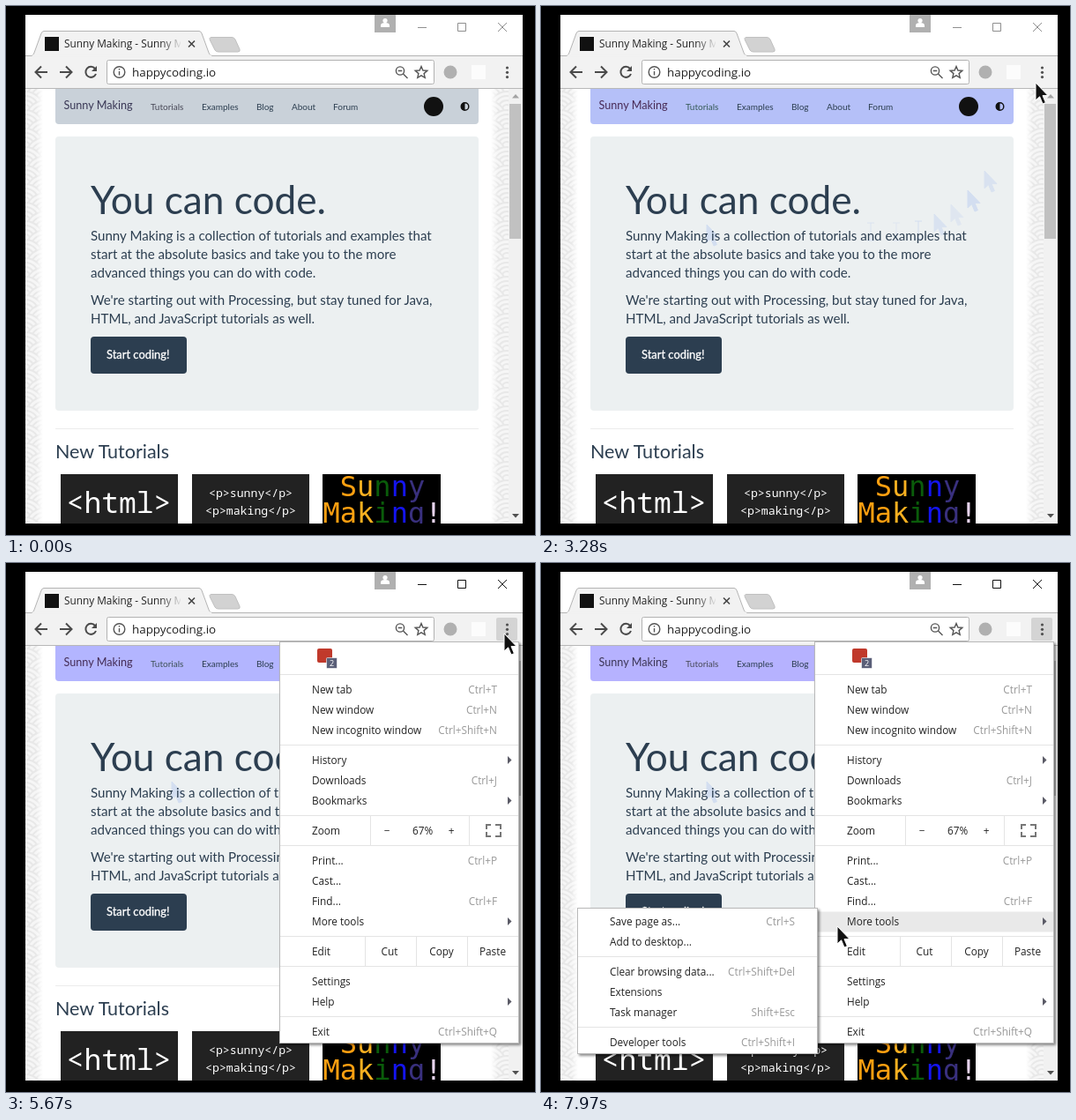
These frames come from a looping animation (600 by 600 pixels, 8000 ms). An HTML page:

```html
<!DOCTYPE html>
<html lang="en">
<head>
<meta charset="utf-8">
<title>Browser menu</title>
<style>
html, body { margin: 0; width: 100%; height: 100%; overflow: hidden; background: #000; }
svg { display: block; width: 100vw; height: 100vh; }
text { white-space: pre; }
.page { font-family: Lato, sans-serif; fill: #2c3e50; }
.lead { font-size: 15.1px; }
.nav { font-size: 10px; }
.ui { font-family: "Open Sans", "Noto Sans", sans-serif; font-size: 11.8px; fill: #222; }
.key { fill: #999; text-anchor: end; }
.mid { text-anchor: middle; }
.code { font-family: "Noto Sans Mono", monospace; fill: #fff; text-anchor: middle; }
.art { font: 32px "DejaVu Sans Mono", monospace; text-anchor: middle; fill: url(#rainbow); }
.line { fill: none; stroke: #e4e4e4; }
.icon { fill: none; stroke: #4a4a4a; stroke-width: 2; }
</style>
</head>
<body>
<svg viewBox="0 0 600 600" xmlns="http://www.w3.org/2000/svg">
  <defs>
    <clipPath id="view"><rect x="22" y="94" width="564" height="493"/></clipPath>
    <clipPath id="tabText"><rect x="60" y="30" width="138" height="26"/></clipPath>
    <linearGradient id="fade"><stop stop-color="#f2f2f2" stop-opacity="0"/><stop offset="1" stop-color="#f2f2f2"/></linearGradient>
    <linearGradient id="edgeL"><stop stop-color="#fff" stop-opacity="0"/><stop offset="1" stop-color="#fff"/></linearGradient>
    <linearGradient id="edgeR"><stop stop-color="#fff"/><stop offset="1" stop-color="#fff" stop-opacity="0"/></linearGradient>
    <linearGradient id="rainbow" gradientUnits="userSpaceOnUse" x1="360" x2="493" y1="0" y2="0"></linearGradient>
    <pattern id="scales" x="22" y="96" width="42" height="21" patternUnits="userSpaceOnUse">
      <g fill="#f6f6f6" stroke="#e8e8e8" stroke-width="2" id="rings"></g>
    </pattern>
    <filter id="shadow" x="-10%" y="-10%" width="120%" height="120%">
      <feDropShadow dx="2" dy="2" stdDeviation="1.5" flood-opacity=".45"/>
    </filter>
    <path id="arrow" d="M0 0V20L4.6 15.8 8 24 11.4 22.6 8 14.6H14Z"/>
    <path id="beam" d="M-4 0H4M0 0V20M-4 20H4"/>
  </defs>

  <rect width="600" height="600"/>
  <rect x="22" y="10" width="564" height="577" fill="#fff"/>

  <!-- title bar -->
  <rect x="418" y="10" width="24" height="20" fill="#b0b0b0"/>
  <path fill="#fff" d="M425 24v-2q0-3 5-3t5 3v2z"/><circle cx="430" cy="16.500" r="2.600" fill="#fff"/>
  <path id="controls" fill="none" d="M467 24.500H477M512.500 19.500h9v9h-9zM558 19l10 10M568 19l-10 10"/>
  <rect x="22" y="57" width="564" height="37" fill="#f2f2f2"/>
  <path d="M22 56.500H29Q31 56 32 53L40 31Q41 28.500 43 28.500H219Q221 28.500 222 31L230 53Q231 56.500 234 56.500H586" fill="#f2f2f2" stroke="#b4b4b4"/>
  <path d="M30 56.500H233" stroke="#f2f2f2" stroke-width="2"/>
  <path d="M233 35.500H256Q259 35.500 260 38L265 49Q266 52 263 52H241Q238 52 237 50L231.500 39Q230 35.500 233 35.500Z" fill="#d2d2d2" stroke="#c0c0c0"/>
  <rect x="44" y="35" width="16" height="16" fill="#111"/>
  <g clip-path="url(#tabText)"><text class="ui" x="66" y="47">Sunny Making - Sunny Making</text></g>
  <rect x="176" y="32" width="24" height="22" fill="url(#fade)"/>
  <path d="M207 39.500l7 7M214 39.500l-7 7" stroke="#444" stroke-width="1.600"/>

  <!-- toolbar -->
  <g class="icon">
    <path d="M47 75H34M40 68.500L33.500 75L40 81.500M61 75H74M68 68.500L74.500 75L68 81.500"/>
    <path d="M101 71A6 6 0 1 0 102 77"/>
  </g>
  <path d="M103 68v6h-6z" fill="#4a4a4a"/>
  <rect x="114.500" y="61.500" width="371" height="27" rx="2" fill="#fff" stroke="#b2b2b2"/>
  <g fill="none" stroke="#555" stroke-width="1.400">
    <circle cx="128.500" cy="75" r="6.300"/><path d="M128.500 74v4.500M128.500 71v1.600"/>
    <circle cx="447" cy="73.500" r="4.600"/><path d="M450.500 77l5 5M444.700 73.500h4.600"/>
    <path d="M471 68.500l1.900 4.500 4.900.4-3.700 3.200 1.100 4.700-4.200-2.500-4.200 2.500 1.100-4.700-3.700-3.200 4.900-.4z"/>
  </g>
  <text class="ui" x="143" y="80" style="font-size:13.400px">happycoding.io</text>
  <circle cx="504" cy="75" r="7.500" fill="#b0b0b0"/>
  <rect x="528" y="67" width="16" height="16" fill="#fcfcfc"/>
  <rect id="button" x="556" y="62" width="24" height="26" rx="2" fill="#d4d4d4"/>
  <g fill="#505050"><circle cx="568.500" cy="70" r="1.600"/><circle cx="568.500" cy="75.300" r="1.600"/><circle cx="568.500" cy="80.600" r="1.600"/></g>
  <path d="M22 93.500H586" stroke="#b8b8b8"/>

  <!-- page -->
  <g clip-path="url(#view)" class="page">
    <rect x="22" y="94" width="548" height="493" fill="url(#scales)"/>
    <rect x="34" y="94" width="8" height="493" fill="url(#edgeL)"/>
    <rect x="550" y="94" width="8" height="493" fill="url(#edgeR)"/>
    <rect x="42" y="94" width="508" height="493" fill="#fff"/>
    <path id="bar" d="M56 94H536V130Q536 134 532 134H60Q56 134 56 130Z"/>
    <text id="brand" x="65.500" y="117" font-size="12.670">Sunny Making</text>
    <g class="nav">
      <text id="first" x="164" y="118">Tutorials</text><text x="222" y="118">Examples</text><text x="284" y="118">Blog</text>
      <text x="324" y="118">About</text><text x="371" y="118">Forum</text>
    </g>
    <circle cx="485" cy="114" r="11" fill="#111"/>
    <circle cx="520.500" cy="114" r="4.300" fill="none" stroke="#111" stroke-width="1.400"/>
    <path d="M520.500 109.500a4.500 4.500 0 0 0 0 9z" fill="#111"/>
    <rect x="56" y="148" width="480" height="311" rx="4" fill="#ecf0f1"/>
    <text x="96" y="236" font-size="44.200">You can code.</text>
    <g id="trail" fill="#d3def0" stroke="#d3def0"></g>
    <g class="lead">
      <text x="96" y="266">Sunny Making is a collection of tutorials and examples that</text>
      <text x="96" y="287">start at the absolute basics and take you to the more</text>
      <text x="96" y="308">advanced things you can do with code.</text>
      <text x="96" y="339">We're starting out with Processing, but stay tuned for Java,</text>
      <text x="96" y="360">HTML, and JavaScript tutorials as well.</text>
    </g>
    <rect x="96" y="375" width="109" height="42" rx="4" fill="#2c3e50"/>
    <text x="114" y="400" font-size="12.900" fill="#fff" stroke="#fff" stroke-width=".3">Start coding!</text>
    <path d="M56 479.500H536" stroke="#ececec"/>
    <text x="56" y="513" font-size="21.500">New Tutorials</text>
    <rect x="62" y="531" width="133" height="60" fill="#222"/>
    <rect x="211" y="531" width="133" height="60" fill="#222"/>
    <rect x="359" y="531" width="134" height="60"  fill="#000"/>
    <text class="code" x="128" y="574.500" font-size="33">&lt;html&gt;</text>
    <g class="code" font-size="13.200"><text x="277.500" y="557">&lt;p&gt;sunny&lt;/p&gt;</text><text x="277.500" y="577">&lt;p&gt;making&lt;/p&gt;</text></g>
    <text class="art" x="427" y="556">Sunny</text>
    <text class="art" x="427" y="586">Making!</text>
    <rect x="570" y="94" width="16" height="493" fill="#f1f1f1"/>
    <rect x="571" y="111" width="13" height="153" fill="#c1c1c1"/>
    <path d="M574 104.500h8l-4-4.500z" fill="#a3a3a3"/>
    <path d="M574 576h8l-4 4.500z" fill="#505050"/>
  </g>

  <g id="menu"></g>
  <g id="submenu"></g>
  <use id="pointer"/>
</svg>
<script>
const LOOP = 8000, ROW = 23, GAP = 11;
const CLICK = 3900, OPEN = 4050, SUBMENU = 6960;
const $ = id => document.getElementById(id);
const label = (x, y, s, cls = '') => `<text class="ui ${cls}" x="${x}" y="${y + 4}">${s}</text>`;
const cell = (x, y, s) => label(x, y, s, 'mid');
const rule = d => `<path class="line" d="${d}"/>`;
const panel = (x, y, w, h) =>
  `<rect x="${x}.5" y="${y}.5" width="${w}" height="${h}" fill="#fff" stroke="#b9b9b9" filter="url(#shadow)"/>`;

// groups are split by lines; "name|shortcut", with > for a submenu
const menu = [
  ['New tab|Ctrl+T', 'New window|Ctrl+N', 'New incognito window|Ctrl+Shift+N'],
  ['History|>', 'Downloads|Ctrl+J', 'Bookmarks|>'],
  ['Zoom'],
  ['Print...|Ctrl+P', 'Cast...|', 'Find...|Ctrl+F', 'More tools|>'],
  ['Edit'],
  ['Settings|', 'Help|>'],
  ['Exit|Ctrl+Shift+Q']
];
const tools = [
  ['Save page as...|Ctrl+S', 'Add to desktop...|'],
  ['Clear browsing data...|Ctrl+Shift+Del', 'Extensions|', 'Task manager|Shift+Esc'],
  ['Developer tools|Ctrl+Shift+I']
];

function layout(groups, y) {
  const rows = [], lines = [];
  for (const group of groups) {
    lines.push(y - 17.5);
    for (const item of group) {
      const [name, key] = item.split('|');
      rows.push({ y, name, key });
      y += ROW;
    }
    y += GAP;
  }
  return { rows, lines };
}
const drawLines = (lines, x, w) => rule(lines.map(y => `M${x} ${y}h${w}`).join(''));
const drawRows = (rows, left, right) => rows.map(({ y, name, key = '' }) =>
  label(left, y, name) + (key === '>'
    ? `<path d="M569 ${y - 5}l4.5 4.5-4.5 4.5z" fill="#5a5a66"/>`
    : label(right, y, key, 'key'))).join('');

const main = layout(menu, 144), sub = layout(tools, 407);

$('menu').innerHTML = panel(310, 89, 271, 455) +
  `<rect id="hover" x="311" width="270" height="${ROW}" fill="#e9e9e9"/>` +
  drawLines(main.lines, 311, 270) +
  rule('M413.5 287v33M525.5 287v33M407.5 424v33M465.5 424v33M523.5 424v33') +
  '<rect x="353" y="97" width="17" height="16" rx="2" fill="#c0392b"/>' +
  '<rect x="363.5" y="107.5" width="12" height="12" rx="1" fill="#5a5f78" stroke="#fff" stroke-width=".6"/>' +
  '<text class="ui mid" x="369.5" y="117" style="font-size:9px;fill:#fff">2</text>' +
  drawRows(main.rows, 347, 557) +
  cell(432, 304, '−') + cell(472.5, 304, '67%') + cell(505, 304, '+') +
  '<path class="icon" d="M545 302v-5h5M555 297h6v5M561 305v5h-6M550 310h-5v-5" style="stroke:#777"/>' +
  cell(435, 441, 'Cut') + cell(494, 441, 'Copy') + cell(552, 441, 'Paste');

$('submenu').innerHTML = panel(41, 391, 272, 165) +
  drawLines(sub.lines.slice(1), 42, 271) + drawRows(sub.rows, 78, 288);

// overlapping scales, each row shifted by half a width
let rings = '';
for (let row = -2; row <= 4; row++)
  for (let x = (row & 1) * 21; x <= 42; x += 42)
    for (let r = 20; r > 0; r -= 5) rings += `<circle cx="${x}" cy="${row * 10.5}" r="${r}"/>`;
$('rings').innerHTML = rings;

const bands = ['#ffa010', '#f8b020', '#0a5c0a', '#1414f0', '#39307e', '#e8d4ee'];
$('rainbow').innerHTML = bands.map((c, i) => {
  const from = i && .28 + (i - 1) * .15, to = .28 + i * .15;
  return `<stop offset="${from}" stop-color="${c}"/><stop offset="${to}" stop-color="${c}"/>`;
}).join('');

// pointer moves: start, end, x, y, downward bow
const moves = [
  [1270, 1490, 188, 248, 0], [2030, 2640, 420, 246, 0], [2640, 3200, 561, 87, 36],
  [3500, 3650, 565, 80, 0], [5780, 6420, 387, 410, 0], [7700, 7930, 336, 412, 0]
];
function pointerAt(t) {
  let x = 49, y = 236;
  for (const [start, end, toX, toY, bow] of moves) {
    const k = Math.min(1, Math.max(0, (t - start) / (end - start)));
    x += (toX - x) * k;
    y += (toY - y) * k + bow * Math.sin(Math.PI * k);
  }
  return [Math.round(x), Math.round(y)];
}
const overText = t => t > 2270 && t < 2690;
const place = t => `translate(${pointerAt(t)})`;
const glyph = t => overText(t) ? '#beam' : '#arrow';

// faint marks the pointer leaves behind
const marks = [2000];
for (let t = 2520; t < 3000; t += 75) marks.push(t);
$('trail').innerHTML = marks.map((t, i) =>
  `<use href="${glyph(t)}" transform="${place(t)}" opacity="${1 - i % 3 * .25}"/>`).join('');

function barColor(t) {
  const k = Math.max(0, (t - 860) / (LOOP - 860)), fast = 1 - (1 - k) ** 4;
  return `rgb(${[201 - 28 * fast + 9 * k, 209 - 31 * (1 - (1 - k) ** 2), 217 + 38 * fast].map(Math.round)})`;
}
const drift = (t, phase, green) => {
  const wave = Math.sin(t / 420 + phase);
  return `rgb(${Math.round(58 + 14 * wave)}, ${Math.round(green - 14 * wave)}, 86)`;
};
const show = (id, on) => { $(id).style.display = on ? '' : 'none'; };

function draw(t) {
  $('bar').style.fill = barColor(t);
  $('brand').style.fill = drift(t, 0, 56);
  $('first').style.fill = drift(t, 2, 84);
  $('controls').setAttribute('stroke', t < CLICK ? '#8f8f8f' : '#111');
  show('button', t >= OPEN);
  show('menu', t >= OPEN);
  show('submenu', t >= SUBMENU);

  const y = pointerAt(t)[1];
  const row = main.rows.find(r => r.key !== undefined && Math.abs(r.y - y) <= ROW / 2);
  show('hover', row);
  if (row) $('hover').setAttribute('y', row.y - ROW / 2);

  [...$('trail').children].forEach((mark, i) => { mark.style.display = t > marks[i] + 40 ? '' : 'none'; });
  const pointer = $('pointer');
  show('pointer', t >= moves[0][0]);
  pointer.setAttribute('href', glyph(t));
  pointer.setAttribute('transform', place(t));
  pointer.setAttribute('fill', '#111');
  pointer.setAttribute('stroke', overText(t) ? '#222' : '#fff');
}

const start = performance.now();
(function frame() {
  draw((performance.now() - start) % LOOP);
  requestAnimationFrame(frame);
})();
</script>
</body>
</html>
```
